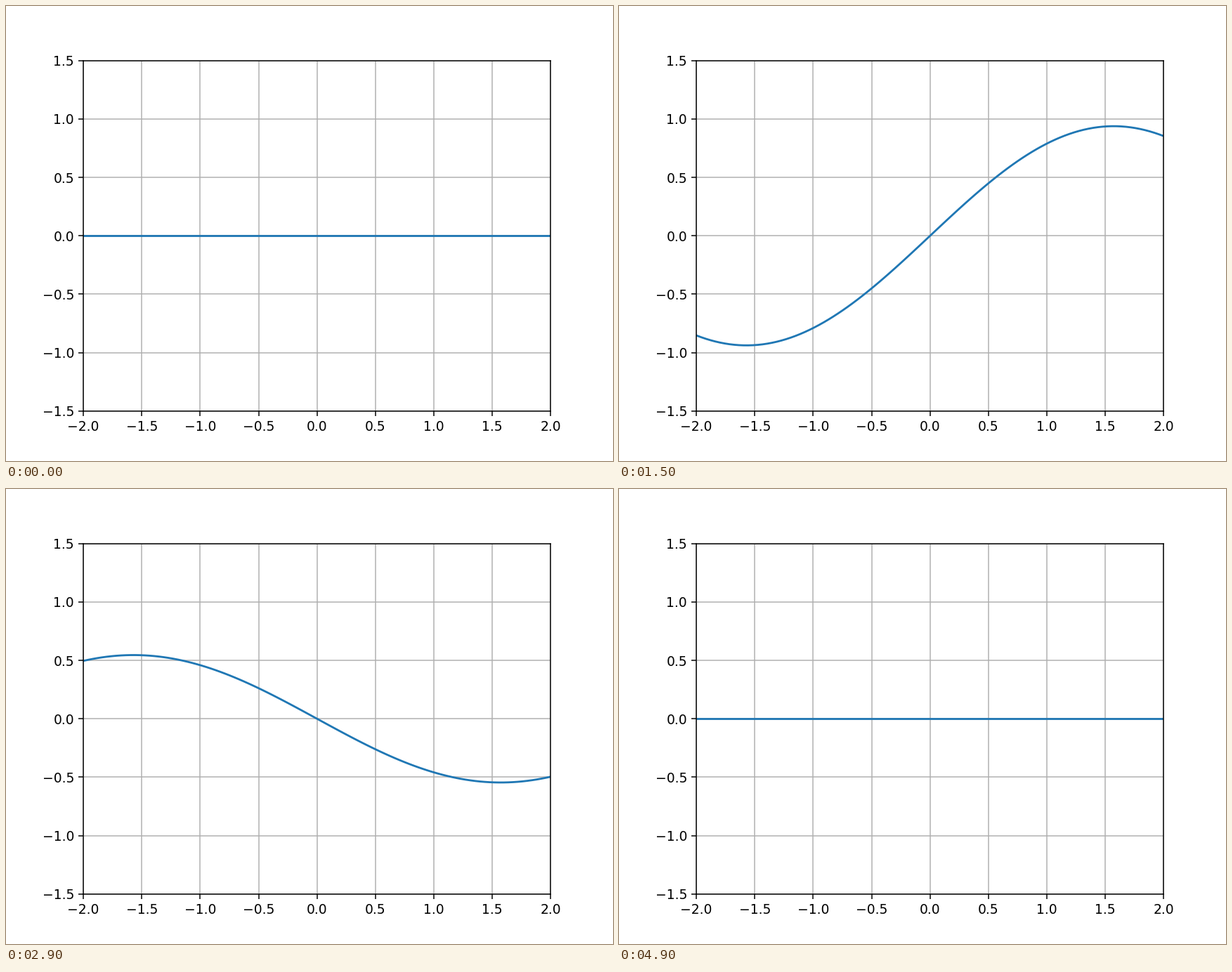
Animation of 864x648 px, one loop 5000 ms. Source, as a matplotlib script:

```python
import numpy as np
import matplotlib.pyplot as plt
from matplotlib.animation import FuncAnimation

FRAMES = 50
INTERVAL = 100  # ms

fig, ax = plt.subplots(figsize=(6.4, 4.8), dpi=135)
ax.set_aspect("equal")
ax.set_xlim(-2, 2)
ax.set_ylim(-1.5, 1.5)
ax.set_xticks(np.arange(-2, 2.1, 0.5))
ax.set_yticks(np.arange(-1.5, 1.6, 0.5))
ax.grid()

x = np.linspace(-2, 2, 100)
wave, = ax.plot(x, np.zeros_like(x), color="#1f77b4", lw=1.5)


def update(frame):
    # The first and last frames both sit at zero amplitude.
    amplitude = np.sin(2 * np.pi * frame / (FRAMES - 1))
    wave.set_ydata(amplitude * np.sin(x))
    return wave,


animation = FuncAnimation(fig, update, frames=FRAMES, interval=INTERVAL,
                          repeat=True, repeat_delay=0)
plt.show()
```
